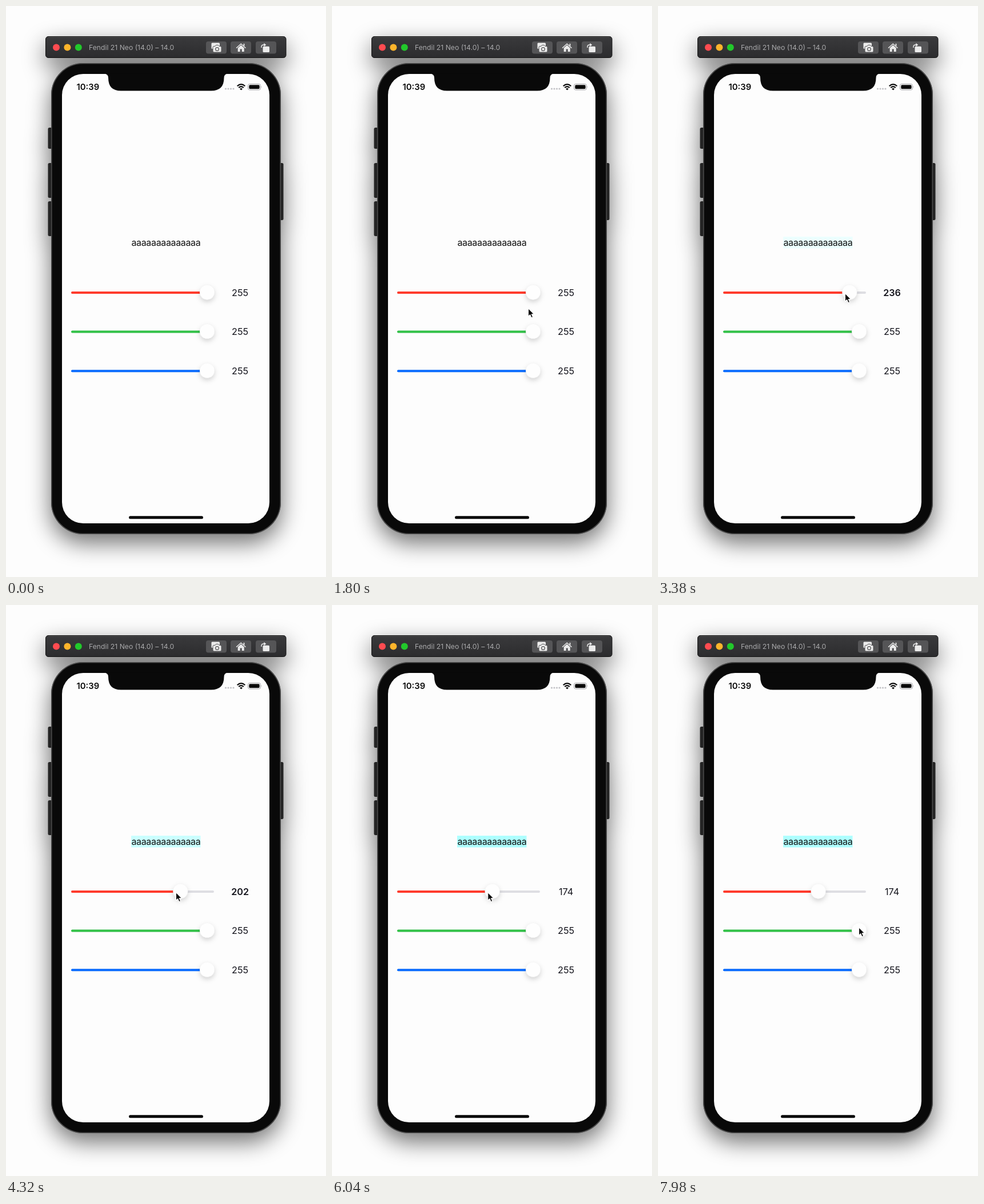
Animation, 560 px wide and 1000 px high, one loop 8 s. Source, as an HTML page:

```html
<!DOCTYPE html>
<html lang="en">
<head>
<meta charset="utf-8">
<title>Colour sliders</title>
<style>
  html, body { margin: 0; width: 100%; height: 100%; overflow: hidden; background: #fdfdfd; }
  svg { display: block; width: 560px; height: 1000px; font-family: Inter, "Open Sans", sans-serif; }
  .label { font-size: 16px; letter-spacing: -.35px; text-anchor: middle; fill: #111; }
  .value { font-size: 16.2px; text-anchor: middle; fill: #14141c; }
  .icon { fill: #ececec; }
</style>
</head>
<body>
<svg viewBox="0 0 560 1000">
  <defs>
    <filter id="soft" x="-30%" y="-20%" width="160%" height="140%">
      <feGaussianBlur stdDeviation="20"/>
    </filter>
    <filter id="lift" x="-60%" y="-60%" width="220%" height="240%">
      <feDropShadow dx="0" dy="4" stdDeviation="4" flood-opacity=".17"/>
    </filter>
    <linearGradient id="bar" x2="0" y2="1">
      <stop stop-color="#3a3a3c"/><stop offset="1" stop-color="#2c2c2e"/>
    </linearGradient>
    <g id="body">
      <rect x="73.5" y="213" width="10" height="37" rx="2.5"/>
      <rect x="73.5" y="275" width="10" height="61" rx="2.5"/>
      <rect x="73.5" y="342" width="10" height="61" rx="2.5"/>
      <rect x="476" y="275" width="9.5" height="100" rx="2.5"/>
      <rect x="79" y="100" width="402" height="825" rx="56"/>
    </g>
  </defs>

  <rect width="560" height="1000" fill="#fdfdfd"/>
  <g filter="url(#soft)" transform="translate(0 15)" opacity=".56">
    <use href="#body"/>
    <rect x="69" y="53" width="421" height="38" rx="5"/>
  </g>

  <!-- toolbar -->
  <rect x="69.5" y="53.5" width="420.5" height="37" rx="4.5" fill="url(#bar)" stroke="#111"/>
  <path d="M74 54.7H485" stroke="#5a5a5a" stroke-width=".8"/>
  <circle cx="88" cy="72.5" r="6" fill="#ff4b50"/>
  <circle cx="107.4" cy="72.5" r="6" fill="#fdb42b"/>
  <circle cx="126.8" cy="72.5" r="6" fill="#22c92b"/>
  <text x="145" y="77.3" font-size="12.2" fill="#a9a9ab">Fendil 21 Neo (14.0) – 14.0</text>
  <g fill="#555557">
    <rect x="350" y="62" width="36" height="21.5" rx="4"/>
    <rect x="393" y="62" width="36" height="21.5" rx="4"/>
    <rect x="437" y="62" width="36" height="21.5" rx="4"/>
  </g>
  <g class="icon">
    <rect x="359.5" y="64.5" width="14.5" height="10.5" rx="1.5"/>
    <path d="M364 70.5h2l1.4-2h4.2l1.4 2h2q2 0 2 2v6.500q0 2-2 2h-11q-2 0-2-2v-6.500q0-2 2-2z" stroke="#555557"/>
    <circle cx="369.5" cy="75.500" r="2.900" fill="none" stroke="#555557" stroke-width="1.2"/>
    <path d="M403.500 73.300L411.200 66.200L419 73.300" fill="none" stroke="#ececec" stroke-width="1.500" stroke-linecap="round" stroke-linejoin="round"/>
    <path d="M415.600 66h1.800v4h-1.800zM405.700 73.500l5.500-5 5.500 5v6.500h-3.900v-4.500h-3.200v4.500h-3.900z"/>
    <rect x="449.500" y="70.800" width="11.500" height="10.200" rx="1.600"/>
    <path d="M447 73v-1.500q0-3.500 4-3.500h1" fill="none" stroke="#ececec" stroke-width="1.400"/>
    <path d="M451.300 65l4 3-4 3z"/>
  </g>

  <!-- device -->
  <use href="#body" fill="#242424"/>
  <rect x="79.800" y="100.800" width="400.400" height="823.400" rx="55" fill="#090909" stroke="#4a4a4a" stroke-width="1.600"/>
  <rect x="98" y="119" width="363" height="787" rx="37" fill="#fdfdfd"/>
  <path d="M172 118.500Q179 119 179 126Q179 148.500 201 148.500H359Q381.500 148.500 381.500 126Q381.500 119 388 118.500Z" fill="#090909"/>

  <!-- status bar -->
  <text x="123.500" y="147" font-size="14.800" font-weight="600" fill="#090909">10:39</text>
  <g fill="#c2c2c6">
    <circle cx="384.500" cy="145" r="1.600"/><circle cx="389" cy="145" r="1.600"/>
    <circle cx="393.500" cy="145" r="1.600"/><circle cx="398" cy="145" r="1.600"/>
  </g>
  <g fill="none" stroke="#090909" stroke-width="2.200">
    <path d="M404.700 140.200q6.800-6 13.600 0M407.200 143q4.300-3.800 8.600 0"/>
  </g>
  <path d="M409 145q2.500-2 5 0l-2.500 2.500z" fill="#090909"/>
  <rect x="423.500" y="136.500" width="22" height="10.500" rx="3" fill="none" stroke="#a4a4a8"/>
  <rect x="425.300" y="138.200" width="18.400" height="7.100" rx="1.700" fill="#090909"/>
  <path d="M446.600 140q1.600 1.700 0 3.500z" fill="#a4a4a8"/>

  <!-- content -->
  <rect id="mark" x="219" y="404" width="121.500" height="20.500"/>
  <text class="label" x="279.900" y="420">aaaaaaaaaaaaaa</text>
  <g id="sliders"></g>
  <rect x="215" y="893.300" width="130" height="5" rx="2.500" fill="#050505"/>
  <path id="cursor" d="M0 0V14.200L3.200 11.200L5.500 16.400L8 15.300L5.800 10.300H10.200Z" fill="#050505" stroke="#fff" stroke-width="1.100" stroke-linejoin="round"/>
</svg>
<script>
  const LOOP = 8000, PRESS = 2800, RELEASE = 5900;
  const $ = id => document.getElementById(id);
  const thumbX = v => 352 - (255 - v) * 0.882;

  // [time, value] while the red thumb is dragged
  const red = [[2900, 255], [3380, 236], [3470, 236], [4320, 202], [5340, 175], [5440, 175], [5520, 174]];
  // [time, x, y] of the pointer outside the drag
  const enter = [[900, 562, 610], [1700, 343.5, 529.5], [2000, 343.5, 529.5], [2600, 344, 503.5]];
  const leave = [[6100, 272.5, 503], [6880, 304, 536], [7040, 306, 537], [7800, 351.5, 564.5]];

  const smooth = u => u * u * (3 - 2 * u);

  function sample(keys, t, ease = u => u) {
    if (t <= keys[0][0]) return keys[0].slice(1);
    const i = keys.findIndex(k => k[0] > t);
    if (i < 0) return keys[keys.length - 1].slice(1);
    const a = keys[i - 1], b = keys[i], u = ease((t - a[0]) / (b[0] - a[0]));
    return a.slice(1).map((p, n) => p + (b[n + 1] - p) * u);
  }

  const slider = (y, color) => `
    <rect x="114" y="${y - 2}" width="250" height="4" rx="2" fill="#dedee3"/>
    <rect class="fill" x="114" y="${y - 2}" width="238" height="4" rx="2" fill="${color}"/>
    <circle class="thumb" cx="352" cy="${y - 0.8}" r="13" fill="#fefefe" stroke="#000" stroke-opacity=".05" stroke-width=".6" filter="url(#lift)"/>
    <text class="value" x="409.600" y="${y + 5.500}">255</text>`;

  $('sliders').innerHTML = [[502, '#ff3b2c'], [570.5, '#31c247'], [639.3, '#0a6cff']]
    .map(s => `<g>${slider(...s)}</g>`).join('');
  const row = $('sliders').firstElementChild;
  const [fill, thumb, value] = ['.fill', '.thumb', '.value'].map(s => row.querySelector(s));

  function pointer(t, x) {
    if (t < 2600) return sample(enter, t, smooth);
    if (t < 6100) return [x - 7.8, 503.3];
    return sample(leave, t, smooth);
  }

  function draw(now) {
    const t = now % LOOP;
    const [v] = sample(red, t);
    const x = thumbX(v);
    fill.setAttribute('width', x - 114);
    thumb.setAttribute('cx', x);
    value.textContent = Math.round(v);
    value.setAttribute('font-weight', t >= PRESS && t < RELEASE ? 600 : 400);
    $('mark').setAttribute('fill', v > 254.5 ? 'none' : `rgb(${Math.round(v)},255,255)`);
    const [px, py] = pointer(t, x);
    $('cursor').setAttribute('transform', `translate(${px} ${py})`);
    $('cursor').setAttribute('visibility', t < 900 ? 'hidden' : 'visible');
  }

  function tick() {
    draw(performance.now());
    requestAnimationFrame(tick);
  }
  tick();
</script>
</body>
</html>
```
